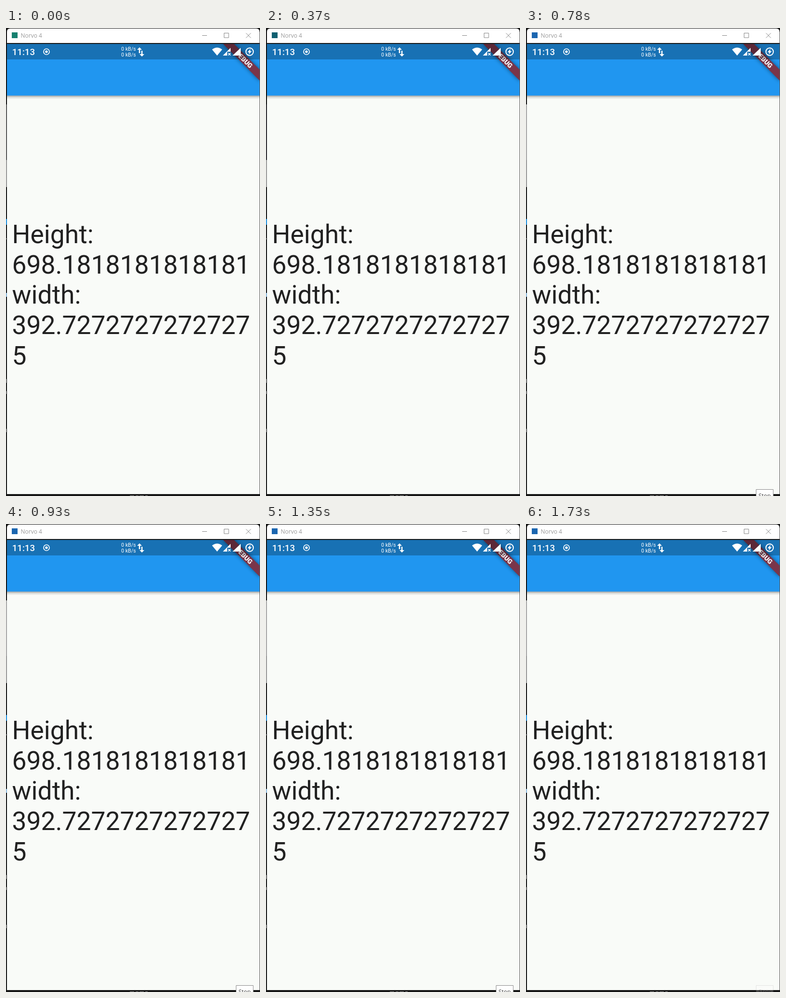
Animation of 527 by 968 pixels, one loop 1.76 s. Source, as an HTML page:

```html
<!DOCTYPE html>
<html lang="en">
<head>
<meta charset="utf-8">
<title>Screen size</title>
<style>
  html, body { margin: 0; width: 100%; height: 100%; overflow: hidden; background: #161616; }
  svg { display: block; width: 527px; height: 968px; }
  text { font-family: Roboto, sans-serif; }
  .ui { font: 12px "Open Sans", sans-serif; }
  .size { font-size: 53.37px; fill: #212121; }
  .clock { font-size: 18.67px; font-weight: 500; }
  .rate { font-size: 10.67px; }
  .debug { font-size: 13.6px; font-weight: 900; text-anchor: middle; }

  .icon, .edge, .tip { animation: 1760ms step-end infinite; }
  .icon { animation-name: icon; }
  .edge { animation-name: edge; }
  .tip { animation-name: tip; animation-timing-function: linear; }
  @keyframes icon {
    0% { fill: #16806f; }
    17% { fill: #0f5f70; }
    44% { fill: #1b66b0; }
  }
  @keyframes edge {
    0% { fill: #5c5c5c; }
    17% { fill: #2c2a30; }
    34% { fill: #a8a8a8; }
    80% { fill: #4a6a9c; }
    94% { fill: #a8a8a8; }
  }
  @keyframes tip {
    0%, 27% { opacity: 0; }
    32.4%, 93% { opacity: 1; }
    98.3%, 100% { opacity: .2; }
  }
</style>
</head>
<body>
<svg viewBox="0 0 527 968">
  <defs>
    <linearGradient id="drop" x2="0" y2="1">
      <stop stop-color="#000" stop-opacity=".4"/>
      <stop offset=".4" stop-color="#000" stop-opacity=".14"/>
      <stop offset="1" stop-color="#000" stop-opacity="0"/>
    </linearGradient>
    <clipPath id="screen"><path d="M2 33H526V964H2z"/></clipPath>
    <filter id="blur" x="-20%" y="-80%" width="140%" height="260%">
      <feGaussianBlur stdDeviation="4"/>
    </filter>
  </defs>

  <!-- Desktop behind the window -->
  <path fill="#161616" d="M0 0H527V968H0z"/>
  <path class="edge" d="M0 158H2V273H0z"/>
  <path fill="#9a9a9a" d="M0 273H2V329H0z"/>
  <path fill="#1e90e0" d="M0 395H2V407H0z"/>
  <path fill="#8dbbe0" d="M0 548H2V556H0z"/>
  <path fill="#bbb" d="M0 435H1V437H0zM0 726H1V734H0zM0 751H1V757H0zM0 829H1V836H0z"/>
  <path stroke="#999" stroke-dasharray="9 3 6 2" d="M257 967.5H294"/>
  <path fill="#555" d="M526 8H527V964H526z"/>

  <!-- Window frame -->
  <path fill="#fff" d="M2 31V8Q2 1 9 1H519Q526 1 526 8V31z"/>
  <path class="icon" d="M12 9H24V21H12z"/>
  <text class="ui" x="30.5" y="20" fill="#999">Norvo 4</text>
  <path fill="none" stroke="#858585" d="M407 15.5H417M452.5 10.5H462V20H452.5zM498 10.5L508 20.5M508 10.5L498 20.5"/>

  <!-- App -->
  <g clip-path="url(#screen)">
    <path fill="#f9fbf8" d="M2 33H526V964H2z"/>
    <path fill="url(#drop)" d="M2 139.5H526V147.5H2z"/>
    <path fill="#2096f0" d="M2 33H526V139.7H2z"/>
    <g class="size">
      <text x="12.5" y="444.8">Height:</text>
      <text x="12.5" y="507.5">698.1818181818181</text>
      <text x="12.5" y="570.2">width:</text>
      <text x="12.5" y="632.9">392.7272727272727</text>
      <text x="12.5" y="695.6">5</text>
    </g>
    <g transform="translate(526 33) rotate(45)">
      <path opacity=".5" filter="url(#blur)" d="M-53 37.3H53V53.3H-53z"/>
      <path fill="#7a354a" d="M-53 37.3H53V53.3H-53z"/>
      <text class="debug" y="50.2" fill="#fff">DEBUG</text>
    </g>
    <path fill-opacity=".25" d="M2 33H526V65H2z"/>
  </g>

  <!-- Status bar -->
  <g fill="#fff">
    <text class="clock" x="12.7" y="56">11:13</text>
    <circle cx="84" cy="49" r="6" fill="none" stroke="#fff" stroke-width="1.7"/>
    <circle cx="84" cy="49" r="2.7"/>
    <text class="rate" x="239" y="47">0 kB/s</text>
    <text class="rate" x="239" y="59">0 kB/s</text>
    <path d="M277 40L282 45H278.3V52H275.7V45H272zM282 59L277 54H280.7V47H283.3V54H287z"/>
    <path d="M438 57L427.5 44.5Q438 36.5 448.5 44.5z"/>
    <path d="M466 41V49H459V57H450zM487 41V57H470z"/>
    <path fill="none" stroke="#fff" stroke-width="1.6" d="M461 51.5L466 56.5M466 51.5L461 56.5"/>
    <circle cx="505.5" cy="49" r="7.7" fill="none" stroke="#fff" stroke-width="2"/>
    <path d="M507.5 43L501 50.2H504.7L503.5 55L510 47.8H506.3z"/>
  </g>

  <g class="tip">
    <path fill="#fff" stroke="#8a8a8a" d="M477.5 954.5H513V974H477.5z"/>
    <text class="ui" x="482.5" y="972" fill="#444">Stop</text>
  </g>
</svg>
</body>
</html>
```
